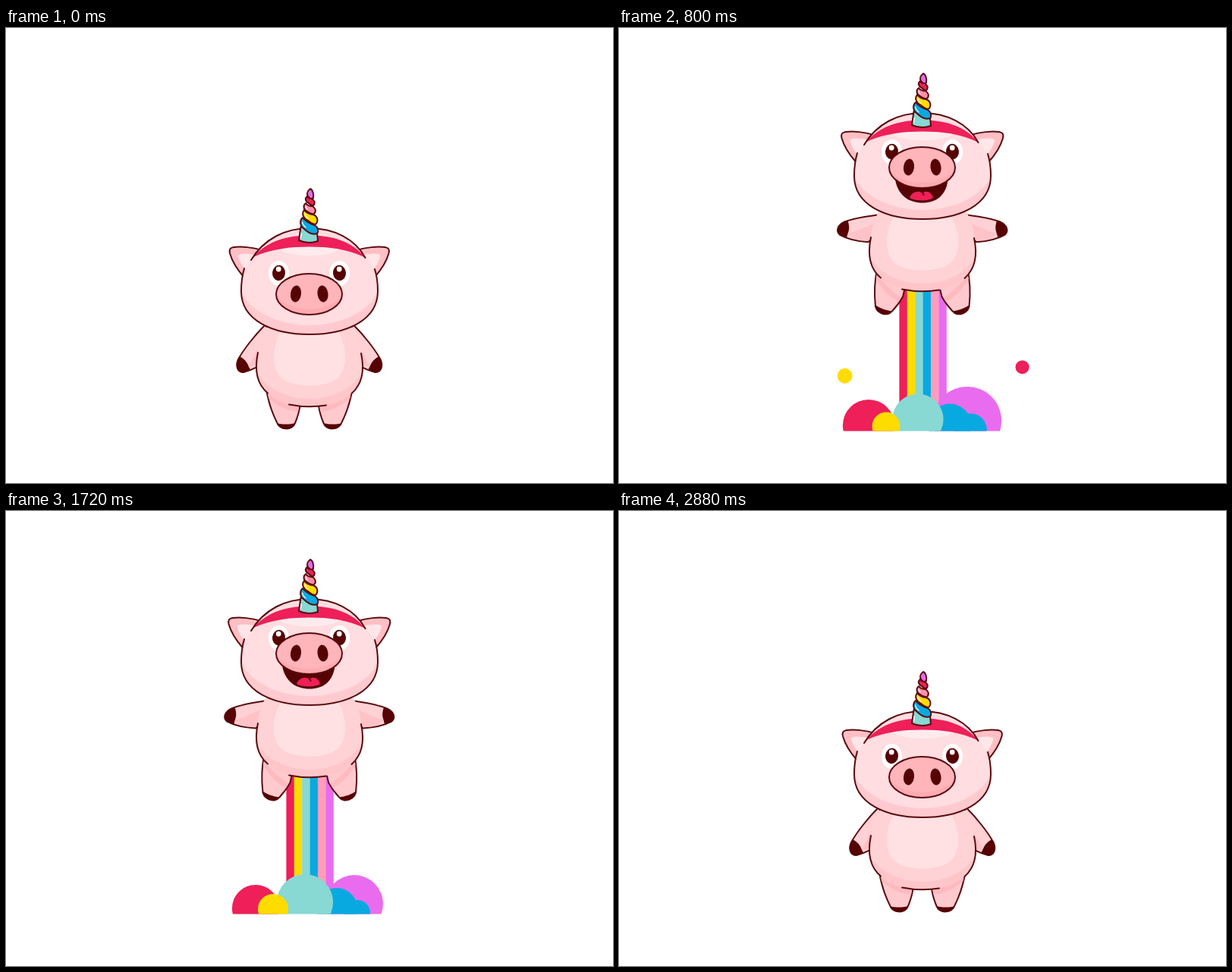
These frames come from a looping animation (800 px wide and 600 px high, 2.96 s). An HTML page:

```html
<!DOCTYPE html>
<html lang="en">
<head>
<meta charset="utf-8">
<title>Jumping unicorn pig</title>
<style>
  html, body { margin: 0; width: 100%; height: 100%; overflow: hidden; background: #fff; }
  svg { display: block; width: 100vw; height: 100vh; }
  .ln { stroke: #5a0b0d; stroke-width: 2; stroke-linecap: round; stroke-linejoin: round; }
  .no { fill: none; }
  .dk { fill: #550303; }
</style>
</head>
<body>
<svg viewBox="0 0 800 600">
  <defs>
    <clipPath id="floor"><rect width="800" height="531.5"/></clipPath>
    <clipPath id="skull"><path d="M400 264C435 264 462 283 476 305C486 318 490 332 490 347C490 386 448 404 400 404C352 404 310 386 310 347C310 332 314 318 324 305C338 283 365 264 400 264Z"/></clipPath>
    <clipPath id="trunk"><path d="M342 395C335 408 332 420 331 432C328 455 332 473 350 486C362 495 380 499 400 499C420 499 438 495 450 486C468 473 472 455 469 432C468 420 465 408 458 395Z"/></clipPath>
    <clipPath id="nose"><ellipse cx="399.5" cy="351" rx="43.5" ry="27"/></clipPath>
  </defs>

  <g clip-path="url(#floor)">
    <g id="column"></g>
    <g id="balls"></g>
    <g id="clouds"></g>
  </g>

  <g id="pig">
    <g id="side">
      <g id="leg">
        <path class="ln" fill="#ffcace" d="M343 476C346 495 352 510 357 520C360 531 378 531 381 521Q386 509 387.500 498L384 470L345 470Z"/>
        <path fill="#ffbabf" d="M345 482C355 490 372 497 386 500L385 506C370 505 356 497 346 488Z"/>
        <path class="dk" d="M357 521C361 531 377 531 381 521C373 523 364 523 357 521Z"/>
      </g>
      <g id="arm">
        <path class="ln" fill="#ffd0d4" d="M341 392C328 405 313 424 306 437C302 446 305 454 313 454C322 452 333 447 347 436L352 400Z"/>
        <path fill="#ffc2c7" d="M337 411C331 423 328 435 318 447C327 447 336 442 346 434L349 410Z"/>
        <path class="dk" d="M308 433C303 442 303 454 313 454C317 453 320 452 322 450C318 445 320 440 308 433Z"/>
      </g>
      <g id="ear">
        <path class="ln" fill="#ffbfc4" d="M336 293C326 289 310 288 300 289C295 290 294 292 295 297C298 308 306 320 314 329L330 320Z"/>
        <path fill="#ffe6e8" d="M306 301Q305 295 330 299L318 321Q309 312 306 301Z"/>
      </g>
    </g>
    <use href="#side" transform="translate(799.500 0) scale(-1 1)"/>

    <g clip-path="url(#trunk)">
      <rect x="320" y="390" width="160" height="115" fill="#ffc6ca"/>
      <ellipse cx="400" cy="430" rx="76" ry="59" fill="#ffd2d6"/>
      <path fill="#ffe1e4" d="M362 401C351 418 350 446 360 458C372 476 428 476 440 458C450 446 449 418 438 401Z"/>
    </g>
    <path class="ln no" d="M332 428C327 452 331 470 345 481.500M468 429C473 452 469 470 455.500 482M373 496.500Q398 501.500 422 497.500"/>

    <g clip-path="url(#skull)">
      <rect x="300" y="260" width="200" height="150" fill="#ffcacf"/>
      <ellipse cx="400" cy="326" rx="96" ry="66" fill="#ffdde1"/>
      <ellipse cx="400" cy="289" rx="41" ry="11" fill="#ffebed"/>
      <path fill="#ee1f59" d="M326 302C345 280 372 273.500 400 273.500C428 273.500 455 280 474 303C450 291 425 288.500 400 288.500C375 288.500 350 291 326 302Z"/>
    </g>
    <path class="ln no" d="M323 306C340 278 368 264 400 264C432 264 460 278 473.500 303M314 317C311 327 310 337 310 347C310 386 352 404 400 404C448 404 490 386 490 347C490 337 489 327 486 318"/>

    <g id="eyes"></g>
    <g id="mouth">
      <path class="dk" d="M364 352C368 374 383 382.500 400 382.500C417 382.500 431 374 433.500 352Z"/>
      <path fill="#ee1f59" d="M383 376C386 368 394 366 400 369.500C405 366 412 368 414 376C408 380.500 390 380.500 383 376Z"/>
      <path class="ln no" stroke-width="1.500" d="M399 368Q401 370 401.500 372"/>
    </g>
    <g id="snout">
      <g clip-path="url(#nose)">
        <rect x="350" y="320" width="100" height="62" fill="#fdabb0"/>
        <ellipse cx="399.500" cy="343" rx="46" ry="28" fill="#ffb5ba"/>
      </g>
      <ellipse class="ln no" cx="399.500" cy="351" rx="43.500" ry="27"/>
      <ellipse class="dk" cx="382" cy="350.500" rx="7" ry="11" transform="rotate(8 382 350.500)"/>
      <ellipse class="dk" cx="417.500" cy="350.500" rx="7" ry="11" transform="rotate(-8 417.500 350.500)"/>
    </g>

    <g class="ln" stroke-width="1.800">
      <path fill="#88d8d3" d="M388.500 262L386 280Q398 285.500 411 281L410 270Z"/>
      <path fill="#08a9e1" d="M391 250C387 253 387 261 392 264C398 270 405 273 410 271C413 267 410 262 407 260C400 258 395 255 391 250Z"/>
      <path fill="#ffdc00" d="M393 240C389 245 392 251 398 254C403 258 407 260 409 258C412 253 410 248 405 246C400 246 396 244 393 240Z"/>
      <path fill="#ff8fa8" d="M395 231C391 234 392 240 397 242C401 245 405 246 407 244C409 240 407 237 404 235C400 235 397 234 395 231Z"/>
      <path fill="#ee1f59" d="M397 222C393 225 395 229 399 231C402 234 405 235 406 233C408 229 406 227 403 225C400 225 398 224 397 222Z"/>
      <path fill="#e06cee" d="M401 212C397 215 396 219 398 222C400 225 403 226 405 224C406 219 404 213 401 212Z"/>
    </g>
    <path class="no" stroke="#fff" stroke-width="1.500" stroke-linecap="round" opacity=".85" d="M390.500 256Q391 260 395 263M394 245Q394 248 398 251M395 235Q395 237 397 239M389 271L388.500 277"/>
  </g>
</svg>

<script>
const LOOP = 2960, STEP = 40;
const RED = '#ee1f59', YELLOW = '#ffdc00', TEAL = '#88d8d3',
      BLUE = '#08a9e1', PINK = '#ff9dba', VIOLET = '#e96cee';
const $ = id => document.getElementById(id);

function add(parent, tag, attrs) {
  const el = document.createElementNS('http://www.w3.org/2000/svg', tag);
  for (const k in attrs) el.setAttribute(k, attrs[k]);
  return parent.appendChild(el);
}
const move = (id, value) => $(id).setAttribute('transform', value);

// [time, value] tables, joined by smooth curves that never overshoot
const height = [[240, 0], [280, 6], [320, 24], [400, 75], [480, 118], [600, 148], [690, 157],
  [800, 152], [1040, 134], [1200, 127], [1360, 134], [1640, 157], [1720, 148], [1800, 112],
  [1880, 54], [1920, 25], [1960, 0], [2400, 0], [2440, 6], [2520, 26], [2640, 39],
  [2760, 26], [2840, 7], [2880, 0]];
const spread = [[240, 0], [280, .22], [400, .85], [500, 1], [1800, 1], [1960, 0],
  [2400, 0], [2440, .22], [2560, .8], [2640, .95], [2720, .8], [2880, 0]];
const smile = [[280, 0], [480, 1], [1800, 1], [1920, 0]];
const lids = [[1280, 1], [1360, 0], [1440, 1]];

function curve(keys, t) {
  const n = keys.length - 1;
  if (t <= keys[0][0]) return keys[0][1];
  if (t >= keys[n][0]) return keys[n][1];
  const rate = i => i < 0 || i >= n ? 0 : (keys[i + 1][1] - keys[i][1]) / (keys[i + 1][0] - keys[i][0]);
  const slope = i => {
    const a = rate(i - 1), b = rate(i);
    return a * b > 0 ? 2 * a * b / (a + b) : 0;
  };
  let i = 0;
  while (t >= keys[i + 1][0]) i++;
  const [t0, v0] = keys[i], [t1, v1] = keys[i + 1], d = t1 - t0, u = (t - t0) / d;
  const s = u * u * (3 - 2 * u);
  return v0 + (v1 - v0) * s + d * u * (1 - u) * (slope(i) * (1 - u) - slope(i + 1) * u);
}

const stripes = [RED, YELLOW, TEAL, BLUE, PINK, VIOLET].map((fill, i) =>
  add($('column'), 'rect', { fill, x: 369.4 + i * 10.38, width: 10.5 }));

// colour, centre, mean radius, cosine and sine part of the pulse
const clouds = [
  [VIOLET, 459, 518, 37.3, .66, 7.9],
  [BLUE, 436, 524, 26.9, .13, 1.6],
  [BLUE, 463, 530, 17.1, .9, 4.8],
  [TEAL, 394, 516, 36, -1.5, -2.6],
  [RED, 329, 524, 30.2, -.2, 3.9],
  [YELLOW, 352, 525, 21.5, 1, -3]
].map(c => ({ c, el: add($('clouds'), 'circle', { fill: c[0] }) }));

// colour, birth, life, start, end, radius
const balls = [
  [TEAL, 240, 320, 462, 520, 556, 468, 8],
  [RED, 620, 320, 462, 520, 548, 430, 9],
  [YELLOW, 700, 370, 350, 520, 238, 389, 9.9],
  [BLUE, 920, 300, 424, 520, 227, 428, 8],
  [VIOLET, 960, 410, 351.7, 513.6, 335.5, 421, 8.5],
  [RED, 1280, 320, 492, 524, 497.7, 359, 11.5],
  [YELLOW, 1320, 360, 352, 512, 347, 455, 5],
  [TEAL, 2400, 440, 462, 520, 555, 468, 8]
].map(b => ({ b, el: add($('balls'), 'circle', { fill: b[0] }) }));

for (const [x, tilt] of [[359.5, 6], [439.5, -6]]) {
  add($('eyes'), 'ellipse', { cx: x, cy: 323.5, rx: 13.5, ry: 16.5, fill: '#fff' });
  add($('eyes'), 'ellipse', { cx: x, cy: 323, rx: 8.5, ry: 10.2, class: 'dk',
    transform: `rotate(${tilt} ${x} 323)` });
  add($('eyes'), 'circle', { cx: x - .3, cy: 318, r: 3.4, fill: '#fff' });
}

function place(el, x, y, r) {
  el.setAttribute('cx', x);
  el.setAttribute('cy', y);
  el.setAttribute('r', Math.max(0, r));
}

function draw(t) {
  const h = curve(height, t), p = h / 148, g = curve(spread, t), m = curve(smile, t);

  move('pig', `translate(0 ${-h})`);
  move('arm', `rotate(${41 * p} 340 411)`);
  move('leg', `rotate(${20 * p} 358 465)`);
  move('ear', `translate(${-1.5 * p} 0)`);
  move('eyes', `translate(0 ${323 - 8 * m}) scale(1 ${curve(lids, t)}) translate(0 -323)`);
  move('snout', `translate(0 ${-15 * m})`);
  move('mouth', `translate(0 350) scale(1 ${m}) translate(0 -350)`);

  const top = 498 - 1.3 * Math.max(0, h - 6);
  for (const s of stripes) {
    s.setAttribute('y', top);
    s.setAttribute('height', h > 0 ? 525 - top : 0);
  }

  const a = (t - 600) / 760 * 2 * Math.PI;
  for (const { c: [, x, y, r, b, s], el } of clouds)
    place(el, 396 + (x - 396) * g, 527 + (y - 527) * g, g * (r + b * Math.cos(a) + s * Math.sin(a)));

  for (const { b: [, t0, life, x0, y0, x1, y1, r], el } of balls) {
    const u = (t - t0) / life, e = 1 - (1 - u) ** 2;
    const on = u > 0 && u < 1;
    place(el, x0 + (x1 - x0) * e, y0 + (y1 - y0) * e, on ? r * Math.min(1, 5 * (1 - u)) : 0);
  }
}

const start = performance.now();
function tick() {
  const t = (performance.now() - start) % LOOP;
  draw(Math.floor(t / STEP) * STEP);
  requestAnimationFrame(tick);
}
tick();
</script>
</body>
</html>
```
